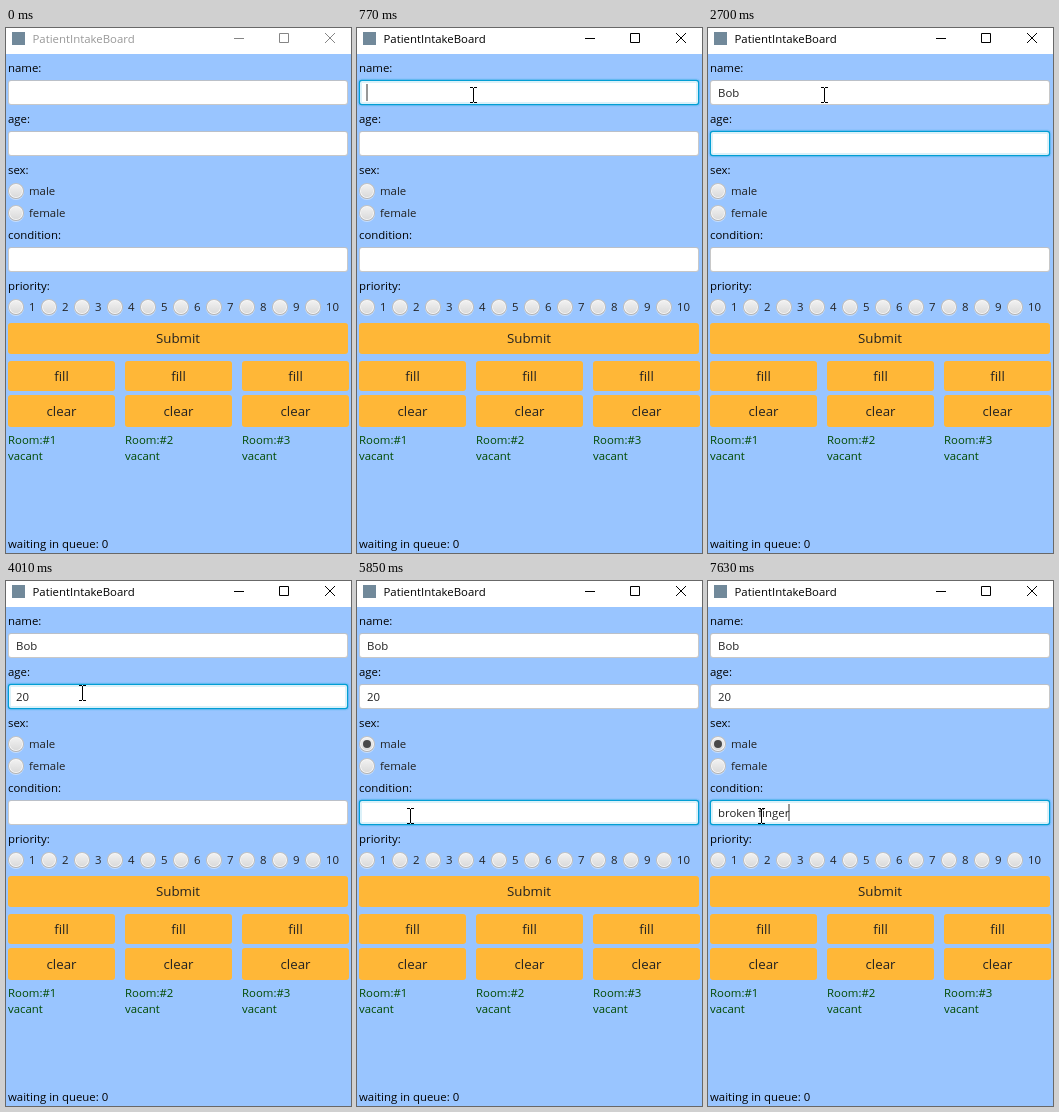
Recreate the animation shown at these times as an HTML page. Size 345 by 525 pixels, loop 8000 ms.

```html
<!DOCTYPE html>
<html lang="en">
<head>
<meta charset="utf-8">
<title>Patient form</title>
<style>
  html, body { margin: 0; width: 100%; height: 100%; overflow: hidden; background: #99c5ff; }
  svg { display: block; width: 345px; height: 525px; font: 11.4px "Open Sans", "Noto Sans", sans-serif; }
  text { white-space: pre; }
  .big { font-size: 13.3px; text-anchor: middle; }
  .soft { fill: #222; }
  .room { fill: #004a00; }
  .ring { fill: #039ed3; }
  .glow { fill: #039ed3; fill-opacity: .14; }
  .crisp { shape-rendering: crispEdges; }
</style>
</head>
<body>
<svg id="stage" viewBox="0 0 345 525">
  <defs>
    <linearGradient id="knob" x2="0" y2="1">
      <stop stop-color="#f1f1f1"/><stop offset="1" stop-color="#dadada"/>
    </linearGradient>
    <linearGradient id="rim" x2="0" y2="1">
      <stop stop-color="#c4c4c4"/><stop offset="1" stop-color="#b2b2b2"/>
    </linearGradient>
    <linearGradient id="edge" x2="0" y2="1">
      <stop stop-color="#b9bfc8"/><stop offset=".15" stop-color="#c8c8c8"/><stop offset="1" stop-color="#c8c8c8"/>
    </linearGradient>
  </defs>
</svg>
<script>
const LOOP = 8000;
const ORANGE = '#ffb737';
const stage = document.getElementById('stage');

function add(tag, attrs) {
  const el = document.createElementNS('http://www.w3.org/2000/svg', tag);
  for (const key in attrs) el.setAttribute(key, attrs[key]);
  return stage.appendChild(el);
}

function label(x, y, content, cls = '') {
  const el = add('text', { x, y, class: cls });
  el.textContent = content;
  return el;
}

const rect = (x, y, width, height, fill, rx = 0) => add('rect', { x, y, width, height, fill, rx });
const circle = (cx, cy, r, fill) => add('circle', { cx, cy, r, fill });
const show = (el, on) => el.setAttribute('visibility', on ? 'visible' : 'hidden');

function button(x, y, width, height, content) {
  const face = rect(x, y, width, height, ORANGE, 3);
  label(x + width / 2, y + height / 2 + 4.5, content, 'big soft');
  return face;
}

function field(y) {
  const layer = (inset, cls, rx) => add('rect', {
    x: 2 + inset, y: y + inset, width: 340 - 2 * inset, height: 25 - 2 * inset, rx, class: cls
  });
  rect(2, y, 340, 25, 'url(#edge)', 3);
  const ring = layer(-.2, 'ring', 3);
  layer(1, '', 2).setAttribute('fill', '#fff');
  const glow = layer(-1.4, 'glow', 4);
  layer(3, '', 0).setAttribute('fill', '#fff');
  const text = label(10, y + 17, '', 'soft');
  const caret = add('rect', { y: y + 4, width: 2, height: 17, fill: '#333', opacity: .5, class: 'crisp' });
  return { ring, glow, text, caret };
}

function radio(x, y, content) {
  circle(x, y + 1, 8, '#fff').setAttribute('opacity', .45);
  const ring = add('circle', { cx: x, cy: y, r: 8.2, class: 'ring' });
  const rim = circle(x, y, 8, 'url(#rim)');
  circle(x, y, 7, '#fafafa');
  const glow = add('circle', { cx: x, cy: y, r: 9.4, class: 'glow' });
  const face = circle(x, y, 6.2, 'url(#knob)');
  const dot = circle(x, y, 4, '#4a4a4a');
  [ring, glow, dot].forEach(el => show(el, false));
  label(x + 13, y + 4, content, 'soft');
  return { ring, glow, rim, face, dot };
}

// Window frame
rect(0, 0, 345, 525, '#99c5ff');
rect(0, 0, 345, 26, '#fff');
rect(6, 4, 13, 13, '#71899a');
const title = label(26.5, 15, 'PatientIntakeBoard');
const controls = add('path', {
  d: 'M228 10.5h10M273.5 5.5h9v9h-9zM319 5l10 10M329 5l-10 10', fill: 'none'
});

// Form
[['name:', 44], ['age:', 95], ['sex:', 146], ['condition:', 211], ['priority:', 262]]
  .forEach(([content, y]) => label(2, y, content));
const fields = { name: field(52), age: field(103), condition: field(219) };
const male = radio(10, 163, 'male');
radio(10, 185, 'female');
for (let i = 0; i < 10; i++) radio(10 + 33 * i, 279, String(i + 1));

const submit = button(2, 295, 340, 31, 'Submit');
[2, 119, 236].forEach((x, i) => {
  button(x, 333, 107, 30, 'fill');
  button(x, 367, 107, 32, 'clear');
  label(x, 416, 'Room:#' + (i + 1), 'room');
  label(x, 432, 'vacant', 'room');
});
label(2, 520, 'waiting in queue: 0');

// Pointers
const arrow = add('path', {
  d: 'M.5.5v16l3.7-3.5 2.6 5.6 2.3-1-2.5-5.6h5z', fill: '#fff', stroke: '#000'
});
const beam = add('path', {
  d: 'M-3-7.5h2.5M1-7.5h3M.5-7v14M-3 7.5h2.5M1 7.5h3', fill: 'none', stroke: '#000', class: 'crisp'
});

// Each step changes part of the state and holds until the next one
const at = (pointer, x, y) => ({ pointer, x, y });
const steps = [
  [0, { pointer: '', x: 0, y: 0, active: false, focus: '', caret: false, hover: '',
        checked: false, name: '', age: '', condition: '' }],
  [230, { ...at('arrow', 136, 300), hover: 'submit' }],
  [330, { ...at('arrow', 114, 92), hover: '' }],
  [380, at('beam', 115, 72)],
  [460, at('beam', 116, 70)],
  [610, at('beam', 116, 68)],
  [690, { ...at('beam', 116, 67), active: true, focus: 'name' }],
  [770, { caret: true }],
  [1230, { caret: false }],
  [2240, { focus: 'age', caret: true }],
  [2700, { caret: false }],
  [3620, { caret: false }],
  [3850, at('beam', 113, 73)],
  [3930, at('arrow', 98, 88)],
  [4010, at('beam', 76, 112)],
  [4080, at('arrow', 54, 136)],
  [4160, { ...at('arrow', 43, 147), caret: true }],
  [4310, { ...at('arrow', 40, 158), hover: 'male' }],
  [4390, at('arrow', 39, 164)],
  [4470, { ...at('arrow', 39, 165), focus: 'male', caret: false }],
  [4540, { checked: true }],
  [4850, { ...at('arrow', 44, 182), hover: '' }],
  [4930, at('arrow', 48, 200)],
  [5080, at('beam', 53, 228)],
  [5160, at('beam', 53, 235)],
  [5310, { focus: 'condition', caret: true }],
  [5850, { caret: false }]
];

function type(key, content, times) {
  times.forEach((time, i) => steps.push([time, { [key]: content.slice(0, i + 1), caret: true }]));
}
type('name', 'Bob', [1460, 1690, 1920]);
type('age', '20', [3080, 3160]);
type('condition', 'broken finger',
  [6080, 6160, 6240, 6320, 6470, 6620, 7020, 7170, 7250, 7330, 7400, 7480, 7630]);
steps.sort((a, b) => a[0] - b[0]);

function render(time) {
  const state = Object.assign({}, ...steps.filter(([start]) => start <= time).map(step => step[1]));

  title.setAttribute('fill', state.active ? '#000' : '#999');
  controls.setAttribute('stroke', state.active ? '#000' : '#858585');
  submit.setAttribute('fill', state.hover === 'submit' ? '#ffc352' : ORANGE);

  for (const [key, { ring, glow, text, caret }] of Object.entries(fields)) {
    const focused = state.focus === key;
    if (text.textContent !== state[key]) text.textContent = state[key];
    show(ring, focused);
    show(glow, focused);
    show(caret, focused && state.caret);
    const width = state[key] ? text.getComputedTextLength() : 0;
    caret.setAttribute('x', Math.floor(9 + width));
  }

  const maleFocused = state.focus === 'male';
  show(male.ring, maleFocused);
  show(male.glow, maleFocused);
  show(male.rim, !maleFocused);
  show(male.dot, state.checked);
  male.face.setAttribute('fill', state.hover === 'male' ? '#f4f4f4' : 'url(#knob)');

  for (const [kind, el] of [['arrow', arrow], ['beam', beam]]) {
    show(el, state.pointer === kind);
    el.setAttribute('transform', `translate(${state.x} ${state.y})`);
  }
}

const begin = performance.now();
function tick() {
  render((performance.now() - begin) % LOOP);
  requestAnimationFrame(tick);
}
tick();
</script>
</body>
</html>
```
